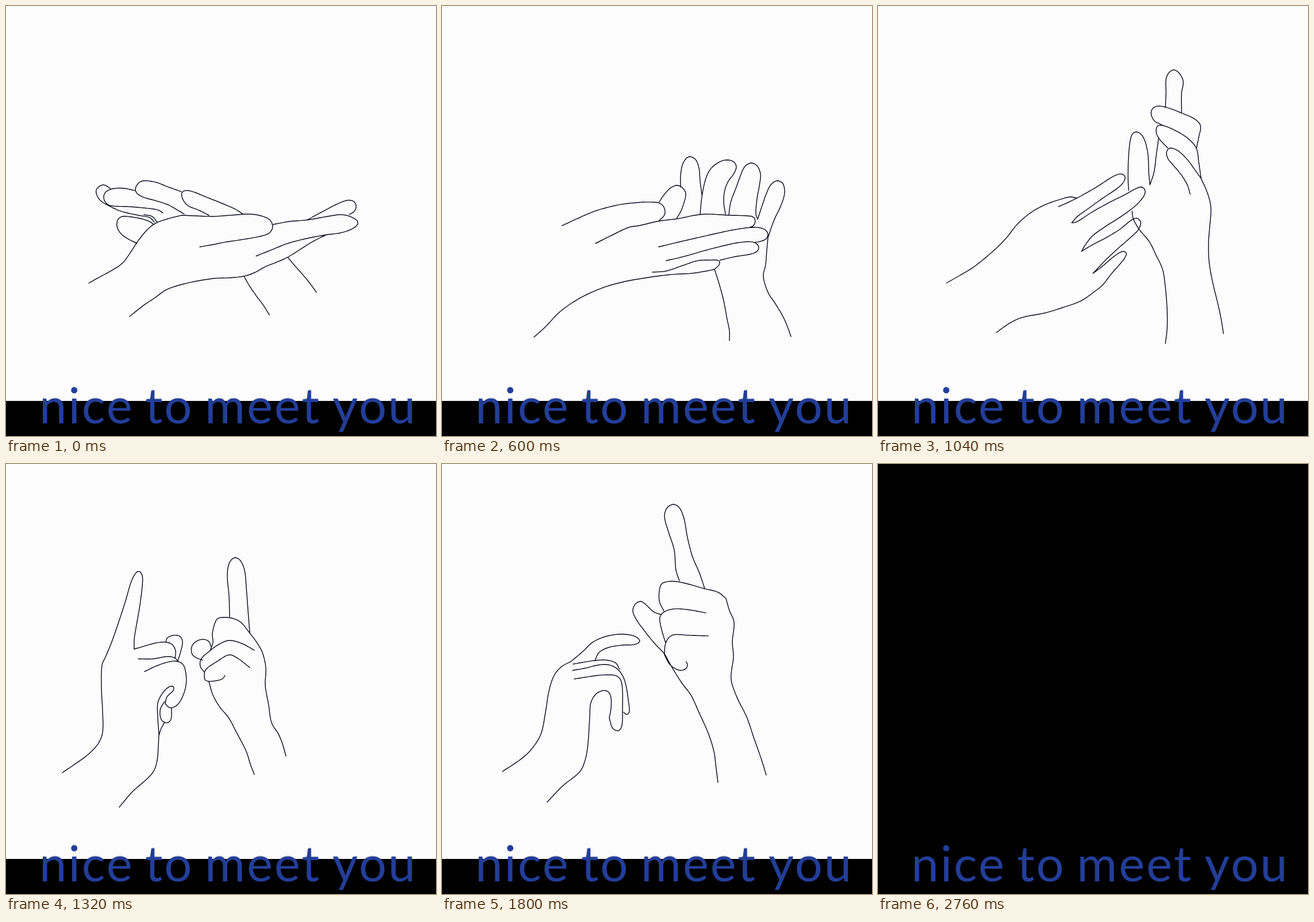
Recreate the animation shown at these times as an HTML page. Size 748 by 748 pixels, loop 8 s.

```html
<!DOCTYPE html>
<html lang="en">
<head>
<meta charset="utf-8">
<title>nice to meet you</title>
<style>
  html, body { margin: 0; width: 100%; height: 100%; overflow: hidden; background: #000; }
  svg { display: block; width: 100%; height: 100%; }
  #hands { fill: none; stroke: #06061c; stroke-width: 1.4; stroke-linejoin: round; stroke-linecap: round; }
  text {
    font: 85px Lato, "Open Sans", sans-serif;
    letter-spacing: 3px;
    fill: #233e99;
    text-shadow: 0 -1px 2px rgba(0, 0, 0, .18);
  }
  #paper { animation: cut 8s step-end infinite; }
  @keyframes cut { 0% { opacity: 1 } 34.5% { opacity: 0 } 100% { opacity: 0 } }
</style>
</head>
<body>
<svg viewBox="0 0 748 748">
  <rect width="748" height="748"/>
  <g id="paper">
    <rect width="748" height="687" fill="#fcfcfc"/>
    <path id="hands"/>
  </g>
  <text y="726"><tspan x="58">nice</tspan> <tspan x="242">to</tspan> <tspan x="346">meet</tspan> <tspan x="568">you</tspan></text>
</svg>
<script>
const LOOP = 8000, STEP = 40, SAMPLES = 56;

// Each hand: poses in time order; "ease" shapes the way to the next pose.
const left = [
  { at: 0, ease: 1, lines: {
    top: '144,482 160,473 184,460 203,447 215,431 228,411 245,390 260,378 282,370 306,364',
    thumb: '306,364 360,366 390,364 425,362 447,366 460,373 464,385 458,395 445,400 413,406 380,411 360,415 337,419',
    index: '526,371 550,358 575,345 594,338 605,340 609,348 606,357 597,363',
    middle: '465,380 492,375 525,372 560,366 585,363 605,369 613,377 605,386 585,394 557,398 525,404 490,413 460,425 435,435',
    low: '215,540 239,521 260,507 278,494 311,483 360,474 385,473 414,470 432,464 450,454 470,446 490,437 514,422 535,409 557,398' } },
  { at: 600, ease: 2, lines: {
    top: '209,382 235,370 260,359 278,353 312,345 350,341',
    thumb: '350,341 375,342 384,347 388,357 386,365 378,373',
    index: '267,413 295,399 325,385 343,382 378,374 410,370 440,364 460,362 500,364 530,365 542,367 545,375 541,383 535,385',
    middle: '377,419 410,411 445,403 480,395 515,388 545,385 560,388 567,396 564,405 552,410 545,411',
    ring: '390,443 420,436 455,426 490,417 520,411 543,411 551,419 548,427 535,432 510,436 484,442',
    pinky: '366,463 390,461 420,451 445,443 465,442 482,443 482,450 474,458',
    low: '160,576 180,558 205,532 240,508 280,490 315,480 360,472 400,467 435,465 460,461 474,458' } },
  { at: 1040, ease: 1, lines: {
    top: '119,482 140,470 165,455 195,431 222,405 242,380 265,360 290,346 318,336 335,332 345,334',
    index: '314,349 330,342 352,331 380,315 410,296 423,292 430,297 426,308 415,318 390,335 365,353 347,366 337,377',
    middle: '337,377 345,376 370,360 400,343 430,328 450,317 460,315 465,322 461,333 445,350 420,368 395,384 373,400 361,415 354,427',
    ring: '354,427 370,417 395,404 420,389 440,373 450,369 457,376 453,389 440,402 415,424 395,443 374,465',
    pinky: '374,465 390,453 410,436 425,427 432,430 428,440 420,450',
    low: '206,568 227,553 250,542 290,534 320,525 353,513 375,498 391,485 405,467 420,450' } },
  { at: 1320, ease: 1.6, lines: {
    top: '98,537 120,522 142,506 160,487 168,467 168,430 166,390 167,350 173,336',
    index: '173,336 183,312 196,275 208,238 217,207 224,192 231,186 237,194 237,212 233,245 227,280 223,305 223,322',
    middle: '223,322 240,317 262,311 278,310 289,314 295,325 294,338',
    thumb: '278,309 281,302 292,298 303,300 307,310 304,326 299,342',
    ring: '230,339 255,339 280,335 293,337 300,344',
    pinky: '241,361 260,352 280,345 297,343 308,349 313,365 313,385 307,405 297,420 285,424 277,417',
    palm: '277,417 280,405 291,394 291,387 283,388 272,399 264,416 264,440 266,470',
    tip: '288,424 287,444 281,450 272,447 268,437 269,425 276,413',
    crease: '276,449 270,460 266,472',
    low: '197,597 220,570 245,548 257,534 263,515 265,490 266,470' } },
  { at: 1800, ease: 1, lines: {
    top: '105,535 135,515 155,497 172,470 180,432 186,395 194,370 206,354 225,343',
    index: '225,343 244,327 262,310 285,300 310,296 330,298 341,303 344,309 335,314 315,315 290,319 273,328 266,342',
    middle: '228,348 245,345 265,342 285,341 302,346 309,357',
    ring: '227,359 250,355 270,350 288,349 303,355 314,368 320,385 324,410 326,430 322,436 316,432',
    pinky: '230,374 255,370 280,367 302,368 311,376 314,395 314,425 313,455 307,464 297,460 291,442',
    palm: '291,442 294,425 294,407 290,397 281,394 268,400 259,415 257,440 255,475',
    low: '183,588 210,560 240,535 249,515 253,495 255,475' } }
];

const right = [
  { at: 0, ease: 1, lines: {
    thumb: '228,413 212,405 199,395 193,383 195,371 203,366 218,367 235,370 250,375 257,380',
    index: '182,318 173,312 165,312 157,320 158,329 165,339 178,347 200,357 230,364 250,368 258,376',
    middle: '225,321 203,317 185,318 174,323 170,331 172,340 180,347 213,349 247,352 265,355 273,360',
    ring: '310,362 295,353 280,345 258,338 240,333 229,327 225,320 228,311 235,305 245,304 262,307 280,314 305,323',
    pinky: '353,364 335,355 316,347 307,335 306,325 312,321 325,323 345,331 375,343 400,354 412,362',
    web: '240,363 254,366 263,376',
    inner: '414,470 423,486 436,505 448,521 458,537',
    outer: '490,437 500,449 515,466 526,479 540,498' } },
  { at: 600, ease: 2, lines: {
    thumb: '378,341 385,330 397,317 408,312 418,316 424,326 421,342 415,358 408,370',
    index: '415,315 415,295 418,277 424,266 431,262 441,267 447,282 449,305 452,328',
    middle: '449,362 452,332 458,303 466,285 478,274 492,268 506,270 512,279 508,291 498,305 492,320 490,340 493,362',
    ring: '499,364 502,342 512,315 520,293 527,279 538,273 548,278 554,292 552,313 548,335 546,362 549,371',
    pinky: '549,371 556,350 564,327 572,311 583,304 593,309 596,325 590,346 577,374 567,403',
    inner: '474,458 482,483 490,513 496,545 500,565 500,582',
    outer: '567,403 565,425 563,450 559,470 567,498 580,518 593,540 601,558 607,575' } },
  { at: 1040, ease: 1, lines: {
    thumb: '436,321 435,298 436,260 439,233 443,222 451,219 460,226 466,240 470,262 471,290 473,311',
    index: '500,176 501,150 501,128 506,116 515,111 525,118 531,132 528,152 528,186',
    middle: '494,207 481,200 475,187 479,177 490,174 510,179 530,187 550,196 561,208 558,228 554,247',
    ring: '504,247 490,232 484,220 486,209 496,208 518,217 540,231 554,248 558,272 562,300',
    pinky: '543,327 538,311 527,293 512,275 504,265 502,254 508,247 522,252 538,267 552,286 562,300',
    web: '473,311 480,290 484,260 488,231',
    inner: '442,357 444,370 454,388 472,410 484,434 495,458 500,490 503,530 503,560 500,587',
    outer: '562,300 573,325 579,350 577,385 575,410 576,445 582,480 591,517 597,545 601,570' } },
  { at: 1320, ease: 1.6, lines: {
    thumb: '357,318 352,308 342,305 330,309 323,318 324,331 333,338 342,341',
    index: '389,266 388,230 385,195 388,173 397,163 407,167 415,185 418,215 421,255 424,294',
    middle: '355,325 360,310 359,295 366,271 375,267 392,268 408,275 424,294',
    ring: '344,361 338,352 339,340 352,327 370,314 388,307 410,312 432,324',
    pinky: '345,362 350,355 368,343 388,332 403,338 424,354',
    web: '345,362 346,375 352,378 365,377 376,374 381,368',
    inner: '353,379 360,402 372,423 387,441 400,465 418,500 425,522 432,540',
    outer: '424,294 436,310 446,328 452,355 451,385 457,420 462,450 474,470 481,487 487,508' } },
  { at: 1800, ease: 1, lines: {
    thumb: '381,262 368,257 355,245 346,239 336,244 332,256 339,272 352,290 368,310 387,330',
    index: '413,203 407,185 404,150 394,118 387,92 391,77 402,70 413,76 421,95 427,128 436,162 448,190 457,217',
    middle: '386,256 378,238 379,215 384,207 402,204 425,208 457,217 480,223 494,234',
    ring: '389,311 382,288 379,267 387,257 405,252 432,254 459,259',
    pinky: '387,332 388,316 393,304 403,297 430,298 463,299',
    web: '387,332 395,347 404,355 415,359 424,356 427,350 425,344',
    inner: '387,330 402,357 418,382 433,402 447,432 463,468 473,500 477,530 480,554',
    outer: '494,234 500,255 508,275 505,310 507,335 503,365 504,381 515,410 530,440 542,475 555,512 564,541' } },
  { at: 2200, ease: 1, lines: {
    thumb: '424,309 408,319 395,339 382,361 380,375 390,392 401,406 410,416 421,412 428,400 428,391',
    index: '434,283 447,282 460,289 467,303 463,318 455,324 440,326 427,321',
    middle: '427,321 424,307 418,293 418,272 427,254 440,243 455,240 475,244 495,254 516,265 530,272',
    ring: '433,336 424,347 422,365 428,391 435,398 450,401 465,395 482,377 495,358 504,340',
    pinky: '443,401 443,405 467,418 490,421 503,413 517,394 537,367',
    web: '465,418 470,427 490,434 510,432 545,413 560,397 576,383',
    inner: '504,434 505,465 508,510 506,540 501,571',
    outer: '530,272 552,293 567,315 579,342 593,364 597,395 605,450 614,500 620,528 626,561' } }
];

const dist = (a, b) => Math.hypot(b[0] - a[0], b[1] - a[1]);
const mix = (a, b, k) => [a[0] + (b[0] - a[0]) * k, a[1] + (b[1] - a[1]) * k];

// Smooth curve through the points, sampled evenly along its length.
function sample(text) {
  const p = text.split(' ').map(s => s.split(',').map(Number));
  const slope = p.map((_, i) => {
    const a = p[Math.max(i - 1, 0)], b = p[i], c = p[Math.min(i + 1, p.length - 1)];
    const d = dist(a, b) + dist(b, c) || 1;
    return [(c[0] - a[0]) / d, (c[1] - a[1]) / d];
  });
  const fine = [p[0]];
  for (let i = 0; i + 1 < p.length; i++) {
    const d = dist(p[i], p[i + 1]);
    for (let j = 1; j <= 12; j++) {
      const u = j / 12, v = 1 - u;
      fine.push([0, 1].map(n =>
        v * v * (1 + 2 * u) * p[i][n] + u * u * (3 - 2 * u) * p[i + 1][n] +
        d * u * v * (v * slope[i][n] - u * slope[i + 1][n])));
    }
  }
  const run = [0];
  for (let i = 1; i < fine.length; i++) run.push(run[i - 1] + dist(fine[i - 1], fine[i]));
  const out = [], total = run[run.length - 1];
  for (let n = 0, i = 1; n < SAMPLES; n++) {
    const want = total * n / (SAMPLES - 1);
    while (i < fine.length - 1 && run[i] < want) i++;
    out.push(mix(fine[i - 1], fine[i], (want - run[i - 1]) / (run[i] - run[i - 1] || 1)));
  }
  return out;
}

for (const pose of [...left, ...right])
  for (const name in pose.lines) pose.lines[name] = sample(pose.lines[name]);

// The left hand draws back a little before it leaves.
const back = {};
for (const name in left[4].lines) back[name] = left[4].lines[name].map(([x, y]) => [x - 18, y + 8]);
left.push({ at: 2000, ease: 1, lines: back });

const toPath = pts => 'M' + pts.map(q => q[0].toFixed(1) + ' ' + q[1].toFixed(1)).join('L');

function drawHand(poses, t) {
  let i = 0;
  while (i < poses.length - 2 && t >= poses[i + 1].at) i++;
  const a = poses[i], b = poses[i + 1];
  const k = Math.min(1, (t - a.at) / (b.at - a.at)) ** a.ease;
  let d = '';
  for (const name of new Set([...Object.keys(a.lines), ...Object.keys(b.lines)])) {
    const from = a.lines[name], to = b.lines[name];
    if ((!from && k === 0) || (!to && k === 1)) continue;
    // A line missing from one pose grows from, or shrinks to, its first point.
    const p = from || to.map(() => to[0]), q = to || from.map(() => from[0]);
    d += toPath(p.map((s, n) => mix(s, q[n], k)));
  }
  return d;
}

const hands = document.getElementById('hands');
const paper = document.getElementById('paper');
let shown = -1;
function frame() {
  const t = Math.floor(performance.now() % LOOP / STEP) * STEP;
  if (t !== shown) {
    shown = t;
    if (t < 2760) hands.setAttribute('d', (t <= 2000 ? drawHand(left, t) : '') + drawHand(right, t));
  }
  requestAnimationFrame(frame);
}
paper.getAnimations().forEach(a => { a.startTime = 0; });
frame();
</script>
</body>
</html>
```
